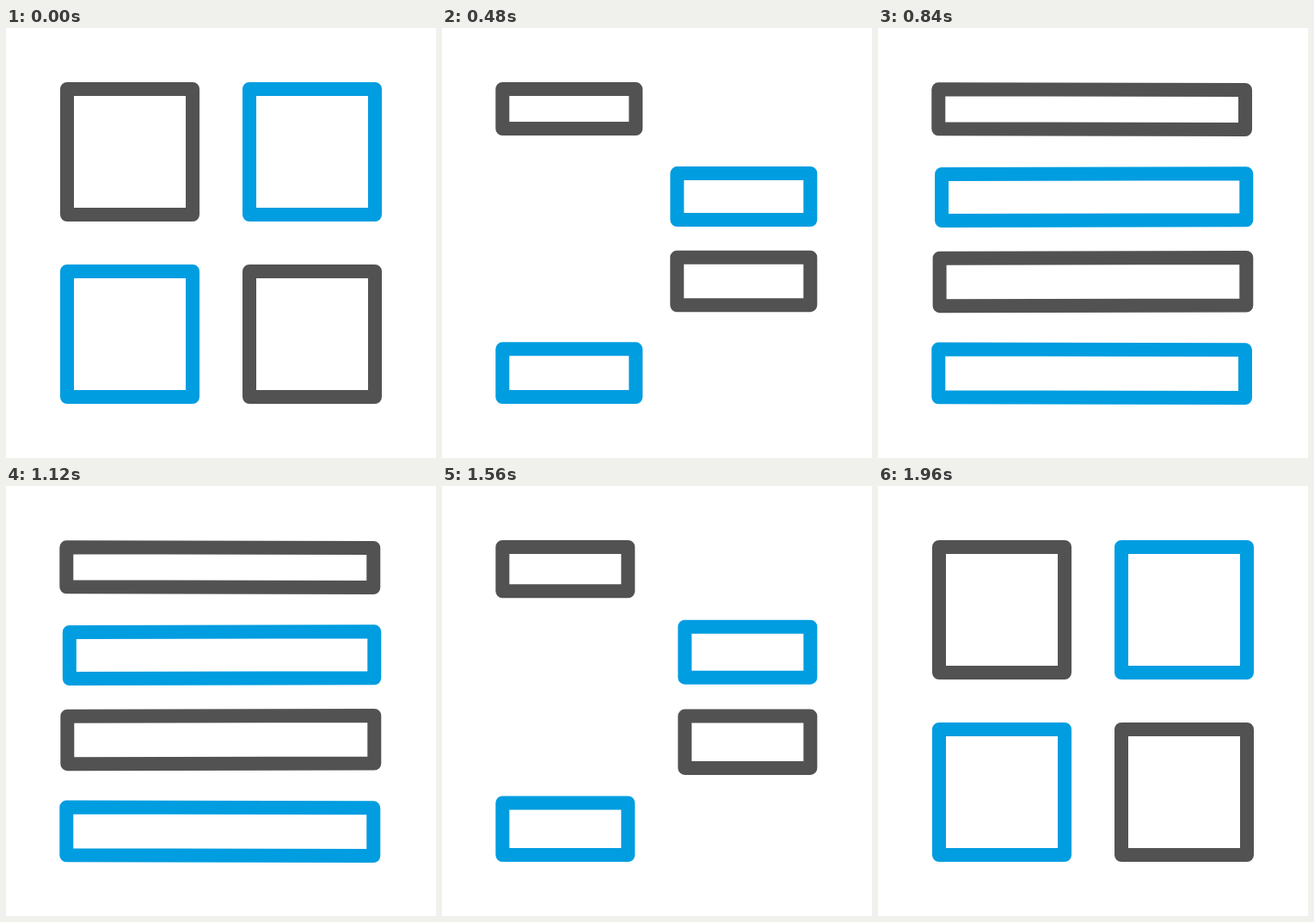
These frames come from a looping animation (500x500 px, 2 s). An HTML page:

```html
<!DOCTYPE html>
<html lang="en">
<head>
<meta charset="utf-8">
<title>Tiles to rows</title>
<style>
html, body { margin: 0; height: 100%; overflow: hidden; background: #fff; }
svg { display: block; width: 100%; height: 100%; fill: none; stroke-width: 16; stroke-linejoin: round; }
.gray { stroke: #525252; }
.blue { stroke: #009de0; }
</style>
</head>
<body>
<svg viewBox="0 0 500 500">
  <path class="gray"/>
  <path class="blue"/>
  <path class="gray"/>
  <path class="blue"/>
</svg>
<script>
const LOOP = 2000, STEP = 40;
const EDGE = 71, SIDE = 146, PITCH = 212;

// Grid cell, then the flattened bar's top and height and how far it stretches
const boxes = [
  { col: 0, row: 0, top: 71, height: 46, reach: PITCH },
  { col: 1, row: 0, top: 169, height: 54, reach: 209.5 },
  { col: 1, row: 1, top: 266.7, height: 55.5, reach: PITCH },
  { col: 0, row: 1, top: 373.3, height: 55.7, reach: PITCH }
];
const paths = document.querySelectorAll("path");

const mix = (a, b, k) => a + (b - a) * k;

function ease(t, from, to) {
  const x = Math.min(1, Math.max(0, (t - from) / (to - from)));
  return x * x * (3 - 2 * x);
}

function outline({ col, row, top, height, reach }, flat, wide) {
  const x = EDGE + PITCH * col - 0.7 * flat;
  const y = mix(EDGE + PITCH * row, top, flat);
  const h = mix(SIDE, height, flat);

  // The outer end stays, the inner end travels and sinks a little
  const dir = col ? -1 : 1;
  const fixed = x + SIDE * col;
  const moving = fixed + dir * (SIDE + reach * wide);
  const y1 = y + 0.3 * wide, y2 = y + wide;
  return `M${fixed} ${y1}L${moving} ${y2}V${y2 + h}L${fixed} ${y1 + h}Z`;
}

function draw(t) {
  const flat = ease(t, 0, 426) - ease(t, 1498, 1940);
  const wide = ease(t, 426, 860) - ease(t, 1104, 1498);
  boxes.forEach((box, i) => paths[i].setAttribute("d", outline(box, flat, wide)));
}

let start;
function tick(now) {
  start ??= now;
  // 25 poses per second; the small lead absorbs timer jitter
  const t = Math.floor((now - start + 8) / STEP) * STEP;
  draw(t % LOOP);
  requestAnimationFrame(tick);
}
draw(0);
requestAnimationFrame(tick);
</script>
</body>
</html>
```
